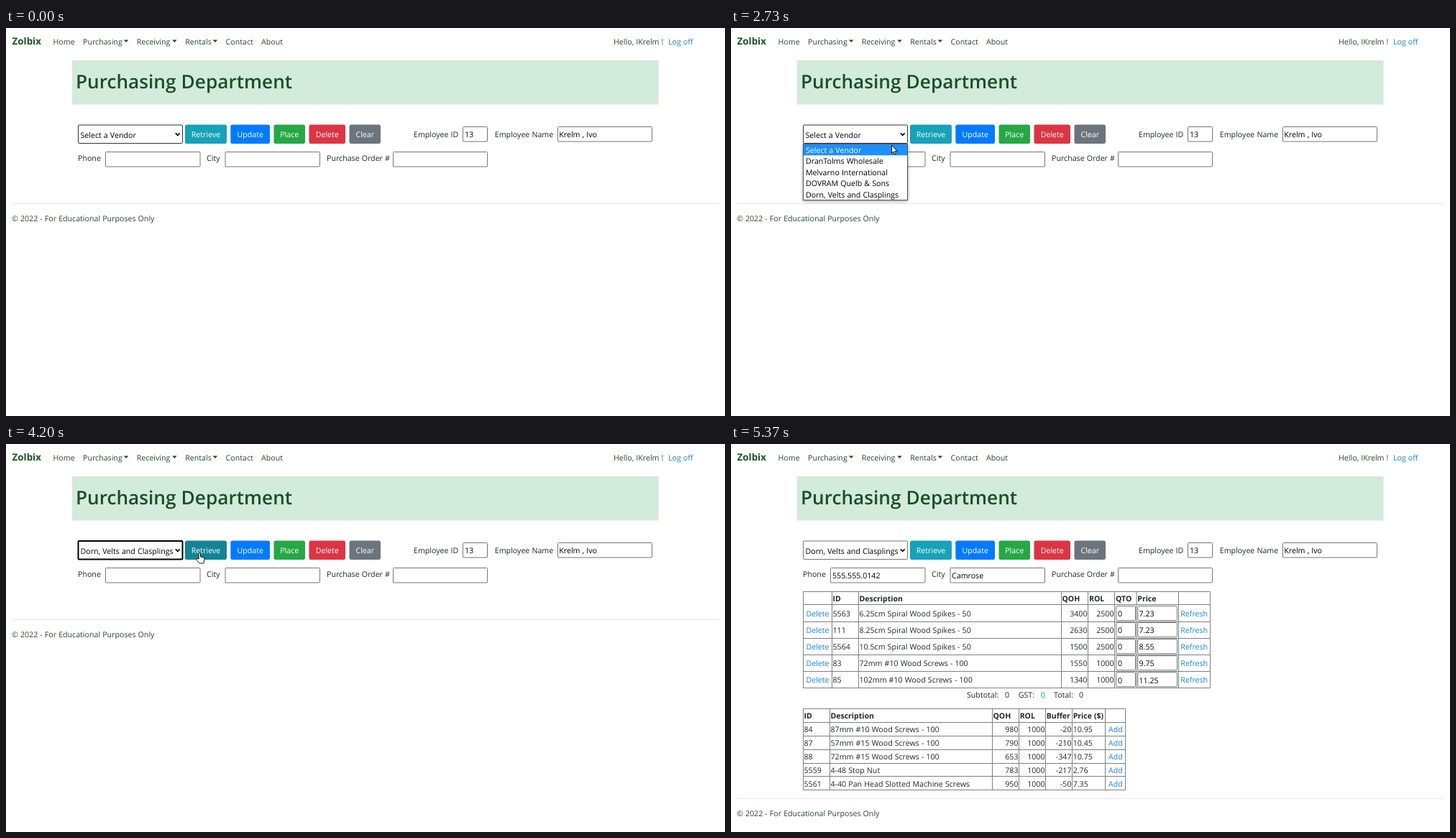
Write an HTML page that moves like this. It is 1000 px wide and 540 px high and loops after 8370 ms.

```html
<!DOCTYPE html>
<html lang="en">
<head>
<meta charset="utf-8">
<title>Purchasing Department</title>
<style>
  html, body { margin: 0; width: 100%; height: 100%; overflow: hidden; background: #fff; }
  svg { display: block; width: 100%; height: 100%; }
  text { font: 10.65px "Open Sans", "Noto Sans", sans-serif; word-spacing: .3px; fill: #212529; white-space: pre; text-rendering: geometricPrecision; }
  .nav { fill: #25472f; }
  .brand { font-size: 13.4px; font-weight: 700; fill: #155724; }
  .title { font-size: 26.2px; font-weight: 600; fill: #1a4f2a; }
  .link { fill: #1a84d8; }
  .white { fill: #fff; }
  .head { font-size: 10.5px; font-weight: 700; }
  .black { fill: #000; }
</style>
</head>
<body>
<svg id="stage" viewBox="0 0 1000 540" xmlns="http://www.w3.org/2000/svg"></svg>
<script>
const LOOP = 8370, STEP = 69;
const VENDORS = ["Select a Vendor", "DranTolms Wholesale", "Melvarno International",
  "DOVRAM Quelb & Sons", "Dorn, Velts and Clasplings"];
const ROW_TOP = 161.7, ROW_H = 15.5;

// Text is placed by the vertical centre of its capitals.
const text = (x, cy, s, cls = "", anchor = "start") =>
  `<text x="${x}" y="${cy + 4}" class="${cls}" text-anchor="${anchor}">${String(s).replace(/&/g, "&amp;")}</text>`;
const rect = (x, y, x2, y2, attrs) =>
  `<rect x="${x}" y="${y}" width="${x2 - x}" height="${y2 - y}" ${attrs}/>`;
const line = (x, y, x2, y2, color) =>
  `<path d="M${x} ${y}L${x2} ${y2}" stroke="${color}" fill="none"/>`;
const input = (x, y, x2, y2, value = "") =>
  rect(x, y, x2, y2, 'fill="#fff" stroke="#767676" rx="1"') + (value && text(x + 2.5, (y + y2) / 2 + .4, value, "black"));
const button = (x, x2, color, label, id = "") =>
  rect(x, 134.5, x2, 161, `rx="2.8" fill="${color}" ${id && `id="${id}"`}`) + text((x + x2) / 2, 148, label, "white", "middle");
const caret = x => `<path d="M${x} 16.6h6.6l-3.3 3.4z" fill="#25472f"/>`;
const group = (id, body) => `<g id="${id}">${body}</g>`;

function grid(xs, ys) {
  const [l, r, t, b] = [xs[0], xs.at(-1), ys[0], ys.at(-1)];
  return xs.map(x => line(x, t, x, b, "#808080")).join("") + ys.map(y => line(l, y, r, y, "#808080")).join("");
}

function page() {
  return rect(0, 0, 1000, 540, 'fill="#fff"') +
    text(8.5, 19.2, "Zolbix", "brand") +
    [[65.5, "Home"], [107, "Purchasing"], [181.7, "Receiving"], [249.2, "Rentals"], [305.6, "Contact"], [355, "About"]]
      .map(([x, s]) => text(x, 18.6, s, "nav")).join("") +
    [163.8, 231.2, 287.6].map(caret).join("") +
    text(845, 18.6, "Hello, IKrelm !", "nav") + text(921, 18.6, "Log off", "link") +
    rect(92, 45, 907.5, 106.5, 'fill="#d3ebda"') +
    `<text x="97" y="83.7" class="title">Purchasing Department</text>` +
    rect(100.5, 135, 245.5, 160.5, 'id="select" rx="1" fill="#fff"') +
    `<text id="choice" x="103.5" y="152.6" class="black"></text>` +
    '<path d="M235.8 146.4l2.9 3 2.9-3" fill="none" stroke="#000" stroke-width="1.6"/>' +
    button(249, 307, "#17a2b8", "Retrieve", "retrieve") +
    button(312.3, 367, "#007bff", "Update") +
    button(372.5, 416, "#28a745", "Place") +
    button(421.5, 472, "#dc3545", "Delete") +
    button(477.5, 521, "#6c757d", "Clear") +
    text(567, 148, "Employee ID") + input(635.5, 137.5, 669.5, 158) + text(638, 148.2, "13", "black") +
    text(679.8, 148, "Employee Name") + input(767.5, 137.5, 898.5, 158) + text(769.3, 148.2, "Krelm , Ivo", "black") +
    text(100, 181.3, "Phone") + input(138.5, 172.5, 270, 193) +
    text(279, 181.3, "City") + input(305, 172.5, 436.5, 193) +
    text(446, 181.3, "Purchase Order #") + input(538.5, 172.5, 669.5, 193) +
    group("results", results()) +
    group("footer", line(8, 244.5, 992, 244.5, "#e8e8e8") + text(8, 264.8, "© 2022 - For Educational Purposes Only", "nav"));
}

function results() {
  let out = text(141, 183.3, "555.555.0142", "black") + text(307, 183.3, "Camrose", "black");

  out += grid([100.5, 140.5, 177.5, 459.5, 496.5, 533.5, 564, 622.5, 666.5], [205.5, 223.5, 247.5, 270.5, 293.5, 316.5, 339.5]);
  [[141.5, "ID"], [178.5, "Description"], [460.5, "QOH"], [498, "ROL"], [535, "QTO"], [565.3, "Price"]]
    .forEach(([x, s]) => out += text(x, 215, s, "head"));
  [[5563, "6.25cm Spiral Wood Spikes - 50", 3400, 2500, "7.23"],
   [111, "8.25cm Spiral Wood Spikes - 50", 2630, 2500, "7.23"],
   [5564, "10.5cm Spiral Wood Spikes - 50", 1500, 2500, "8.55"],
   [83, "72mm #10 Wood Screws - 100", 1550, 1000, "9.75"],
   [85, "102mm #10 Wood Screws - 100", 1340, 1000, "11.25"]].forEach(([id, name, qoh, rol, price], i) => {
    const y = 236 + 23.05 * i;
    out += text(120.5, y, "Delete", "link", "middle") + text(141.5, y, id) + text(178.5, y, name) +
      text(495.5, y, qoh, "", "end") + text(532.5, y, rol, "", "end") +
      input(535.8, y - 10.4, 562.5, y + 9.6) + text(538, y + .3, 0, "black") +
      input(565.8, y - 10.4, 620.5, y + 9.6) + text(567.5, y + .3, price, "black") +
      text(644.2, y, "Refresh", "link", "middle");
  });
  [[328, "Subtotal:"], [381, "0"], [399.7, "GST:"], [449, "Total:"], [484, "0"]].forEach(([x, s]) => out += text(x, 349, s));
  out += text(430.7, 349, "0", "link");

  out += grid([100.5, 137.5, 363.5, 400.5, 437.5, 474.5, 520.5, 548.5], [368.5, 387.5, 406.5, 425.5, 444.5, 462.5, 481.5]);
  [[101.5, "ID"], [138.5, "Description"], [364.5, "QOH"], [401.7, "ROL"], [438.7, "Buffer"], [475.7, "Price ($)"]]
    .forEach(([x, s]) => out += text(x, 378.2, s, "head"));
  [[84, "87mm #10 Wood Screws - 100", 980, -20, "10.95"],
   [87, "57mm #15 Wood Screws - 100", 790, -210, "10.45"],
   [88, "72mm #15 Wood Screws - 100", 653, -347, "10.75"],
   [5559, "4-48 Stop Nut", 783, -217, "2.76"],
   [5561, "4-40 Pan Head Slotted Machine Screws", 950, -50, "7.35"]].forEach(([id, name, qoh, buffer, price], i) => {
    const y = 397 + 18.9 * i;
    out += text(101.5, y, id) + text(138.5, y, name) + text(399.5, y, qoh, "", "end") +
      text(436.5, y, 1000, "", "end") + text(473.5, y, buffer, "", "end") +
      text(475.7, y, price) + text(535, y, "Add", "link", "middle");
  });
  return out;
}

function menu() {
  return rect(100.5, 161.5, 245.5, 239.5, 'fill="#fff" stroke="#555" style="filter:drop-shadow(0 1px 2px #0006)"') +
    rect(101, 0, 245, ROW_H, 'id="bar" fill="#1e90ff"') +
    VENDORS.map((s, i) => text(104, 169.9 + 15.4 * i, s, "vendor black")).join("");
}

const stage = document.getElementById("stage");
stage.innerHTML = page() + group("menu", menu()) +
  '<circle id="click" r="8.7" fill="#ff0" fill-opacity=".58"/>' +
  group("pointer",
    '<path id="arrow" d="M0 0V10.8L2.5 8.6 4.2 12.6 6 11.8 4.3 8H7.7Z" fill="#fff" stroke="#000" stroke-width=".9"/>' +
    '<path id="hand" d="M-1.4 8V1Q-1.4-.4-.2-.4 1-.4 1 1V5L5.4 6Q6.7 6.4 6.5 8.2L5.4 14H-.5L-4.5 9.3Q-4.7 7.3-3 7.5Z" fill="#fff" stroke="#000" stroke-width=".9"/>');
const el = id => document.getElementById(id);
const show = (id, on) => el(id).setAttribute("display", on ? "inline" : "none");
const vendorRows = [...document.querySelectorAll(".vendor")];

// Each path: time of its first step, then keys of [ms, x, y].
const PATHS = [
  [1010, [[1000, 941, 466], [1215, 660, 425], [1360, 487, 354], [1424, 438, 328], [1640, 302, 245], [1770, 266, 216], [1990, 235, 170], [2120, 221, 148.5]]],
  [2660, [[2590, 221, 148.5], [2800, 224, 172], [3010, 220, 206], [3210, 218, 225.5]]],
  [3500, [[3570, 218, 225.5], [3850, 233, 200], [4060, 259, 167], [4190, 269.5, 152]]],
  [4400, [[4400, 269.5, 152], [4470, 275, 159], [4607, 305, 186], [4830, 452, 236], [5090, 705, 288], [5228, 864, 306], [5297, 952, 313]]]
];

function along(keys, t) {
  const n = keys.length - 1;
  t = Math.min(Math.max(t, keys[0][0]), keys[n][0]);
  let i = 0;
  while (i < n - 1 && t > keys[i + 1][0]) i++;
  const a = keys[i], b = keys[i + 1], span = b[0] - a[0], u = (t - a[0]) / span;
  const slope = (k, c) => {
    const p = keys[Math.max(0, k - 1)], q = keys[Math.min(n, k + 1)];
    return (q[c] - p[c]) / (q[0] - p[0]) * span;
  };
  return [1, 2].map(c => {
    const d = b[c] - a[c], m = slope(i, c), k = slope(i + 1, c);
    return a[c] + u * (m + u * (3 * d - 2 * m - k + u * (m + k - 2 * d)));
  });
}

function pointerAt(t) {
  const [start, keys] = PATHS.filter(p => t >= p[0]).pop() || PATHS[0];
  return along(keys, start + Math.floor((t - start) / STEP) * STEP);
}

function draw(t) {
  const [x, y] = pointerAt(t);
  const visible = t >= 1000 && t < 5370;
  const open = t >= 2270 && t < 3570;
  const picked = t >= 3570, loaded = t >= 4470;
  const over = visible && x > 249 && x < 307 && y > 134.5 && y < 161;

  show("pointer", visible);
  el("pointer").setAttribute("transform", `translate(${x} ${y})`);
  show("arrow", !over);
  show("hand", over);
  el("retrieve").setAttribute("fill", over ? "#138496" : "#17a2b8");

  show("click", [2200, 3500, 4330].some(s => t >= s && t < s + 130));
  el("click").setAttribute("cx", x);
  el("click").setAttribute("cy", y);

  el("choice").textContent = VENDORS[picked ? 4 : 0];
  const focused = picked && !loaded;
  el("select").setAttribute("stroke", loaded ? "#767676" : focused ? "#000" : "#333");
  el("select").setAttribute("stroke-width", focused ? 2 : 1);

  show("menu", open);
  const row = Math.min(4, Math.max(0, Math.floor((y - ROW_TOP) / ROW_H)));
  el("bar").setAttribute("y", ROW_TOP + row * ROW_H);
  vendorRows.forEach((r, i) => r.setAttribute("class", i === row ? "vendor white" : "vendor black"));

  show("results", loaded);
  el("footer").setAttribute("transform", `translate(0 ${loaded ? 249 : 0})`);
}

const begin = performance.now();
function tick() {
  draw((performance.now() - begin) % LOOP);
  requestAnimationFrame(tick);
}
tick();
</script>
</body>
</html>
```
